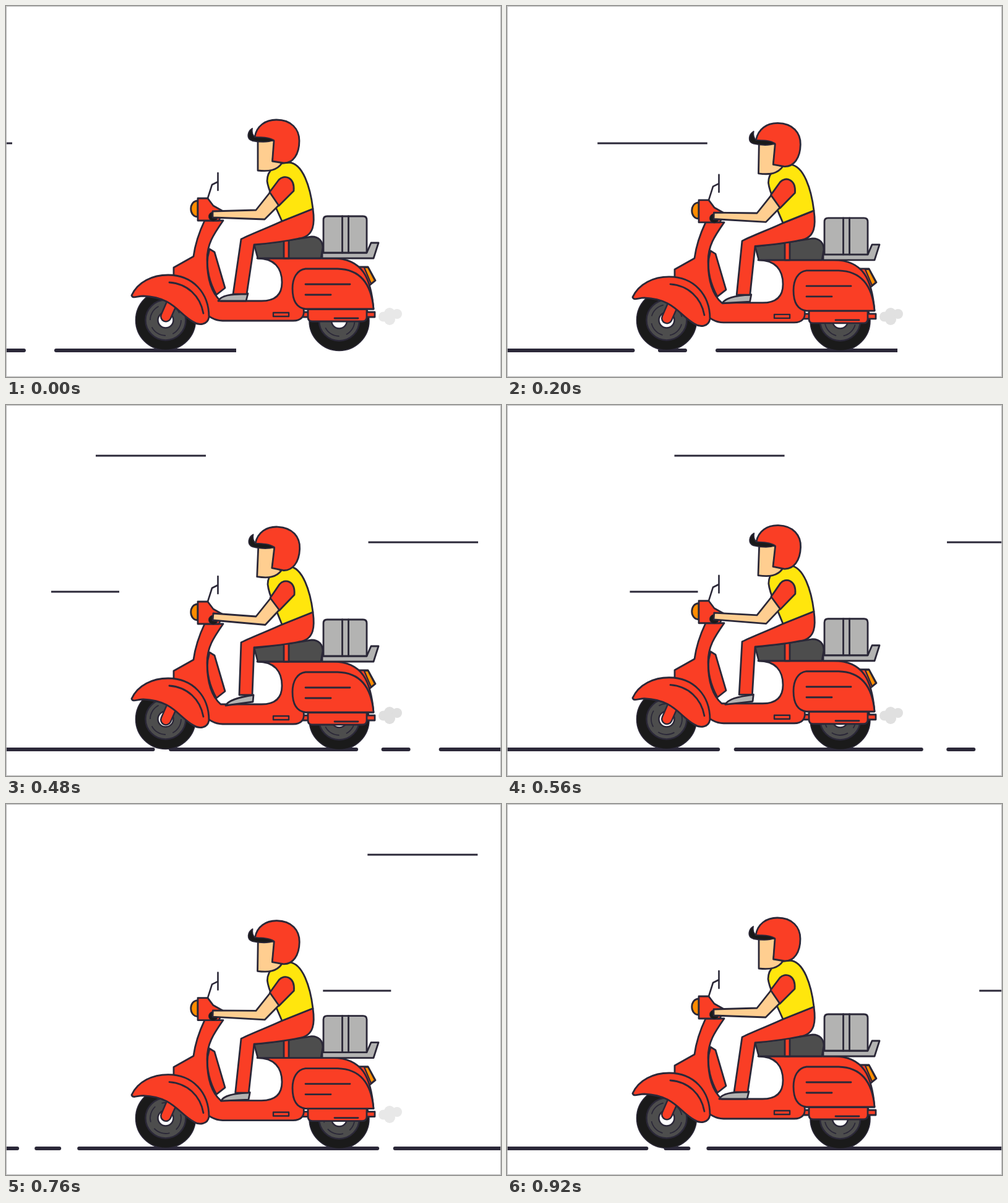
Animation, 800 px wide and 600 px high, one loop 960 ms. Source, as an HTML page with a canvas:

```html
<!DOCTYPE html>
<html lang="en">
<head>
<meta charset="utf-8">
<title>Scooter ride</title>
<style>
html, body { margin: 0; width: 100%; height: 100%; overflow: hidden; background: #fff; }
canvas { display: block; }
</style>
</head>
<body>
<canvas id="stage" width="800" height="600"></canvas>
<script>
const ctx = document.getElementById('stage').getContext('2d');
const LOOP = 960, STEP = 40, BOUNCE = 7;
const INK = '#2b2838', RED = '#fa3e25', YELLOW = '#ffe60d', SKIN = '#ffce90',
      ORANGE = '#ff8c00', GREY = '#b3b3b2', DARK = '#4d4d4d', BLACK = '#1a1a1a';
const TAU = Math.PI * 2;

const mix = (a, b, k) => a + (b - a) * k;

function shape(d, fill, width = 2.8) {
  const path = new Path2D(d);
  if (fill) { ctx.fillStyle = fill; ctx.fill(path); }
  if (width) { ctx.strokeStyle = INK; ctx.lineWidth = width; ctx.stroke(path); }
}

function disc(x, y, r, fill, width = 0) {
  ctx.beginPath();
  ctx.arc(x, y, r, 0, TAU);
  ctx.fillStyle = fill;
  ctx.fill();
  if (width) { ctx.strokeStyle = INK; ctx.lineWidth = width; ctx.stroke(); }
}

// Blends two paths that share the same commands.
function blend(from, to, k) {
  const ends = to.match(/-?[\d.]+/g);
  let i = 0;
  return from.replace(/-?[\d.]+/g, n => mix(+n, +ends[i++], k).toFixed(2));
}

// Piecewise linear value through [time, value] pairs.
function track(keys, t) {
  const i = Math.max(1, keys.findIndex(key => key[0] >= t));
  const [t0, v0] = keys[i - 1], [t1, v1] = keys[i];
  return mix(v0, v1, (t - t0) / (t1 - t0));
}

function speedLines(t) {
  ctx.fillStyle = INK;
  for (const [x, y, length] of [[-167.5, 222, 177.5], [-608, 82, 178], [-680, 302, 110]])
    ctx.fillRect(x + t * 1.5688, y - 1.5, length, 3);
}

function ground(t) {
  const dashes = [[-1400, -964], [-937, -896], [-868, -382], [-357.5, -53.5], [-14, 31], [79, 373]];
  ctx.fillStyle = INK;
  for (const [a, b] of dashes) {
    const left = a + t * 1.295, right = b + t * 1.295;
    const end = b === 373 ? 0 : 3;
    ctx.beginPath();
    ctx.roundRect(left - 1, 554, right - left + (end ? 2 : 0), 6, [3, end, end, 3]);
    ctx.fill();
  }
}

function wheel(x, y, t) {
  disc(x, y, 48.5, BLACK, 1.5);
  disc(x, y, 32.5, DARK, 2.5);
  ctx.save();
  ctx.translate(x, y);
  ctx.rotate(-t / LOOP * TAU);
  ctx.strokeStyle = INK;
  ctx.lineWidth = 1.8;
  for (let i = 0; i < 4; i++) {
    ctx.beginPath();
    ctx.arc(0, 0, 25, i * TAU / 4, i * TAU / 4 + 1.1);
    ctx.stroke();
  }
  ctx.restore();
  disc(x, y, 12.5, '#fff', 2.5);
}

function smoke(t) {
  const level = track([[0, 23], [200, 30], [320, 34], [480, 32], [560, 31], [760, 23], [880, 12], [920, 0]], t);
  const tone = Math.round(255 - level);
  const fill = `rgb(${tone},${tone},${tone})`;
  for (const [x, y, r] of [[610, 502.5, 8], [620, 497, 9], [632, 498, 8], [620, 507, 9]])
    disc(x, y, r, fill);
}

function fork() {
  ctx.lineCap = 'round';
  for (const [color, width] of [[INK, 19], [RED, 14]]) {
    ctx.beginPath();
    ctx.moveTo(269, 478);
    ctx.lineTo(258.5, 502);
    ctx.strokeStyle = color;
    ctx.lineWidth = width;
    ctx.stroke();
  }
}

function scooter() {
  shape('M480 495H596V503H480Z', RED);
  shape('M488 490H583V503Q583 510 576 510H495Q488 510 488 503Z', RED);
  shape('M531 505H569');
  shape('M563 422H585L597 444L586 453Z', RED);
  shape('M579 423H585L596 444L590 449Z', ORANGE, 2.2);

  // Body with leg shield, floor and tail
  shape('M271 440V423L303 405C306 383 312 366 321 347H351C335 370 325 385 325 410' +
    'C325 441 332 464 347 477H413C436 477 446 466 446 447C446 424 434 408 406 408' +
    'H528C576 408 590 440 594 490H481C483 502 477 509 464 509H350C338 509 325 502 315 490Z', RED);
  shape('M329 393L337 398L354 456L340 467C329 447 324 425 326 406Z', RED);
  shape('M484 425H536C577 426 591 455 594 490H484C468 488 463 474 463 457C463 440 470 427 484 425Z', RED);
  shape('M484 450H556M484 467H525');
  shape('M432 496H457V502H432Z', RED, 2.4);

  fork();
  shape('M203 468C213 446 237 435 262 435C302 435 328 464 328 503C326 516 312 517 303 511' +
    'C278 497 270 471 222 469C212 469 205 474 203 468Z', RED);
  shape('M264 447C293 449 314 469 319 497');

  // Rack, parcel and seat
  shape('M511 399H583L590 383H602L594 408H511Z', GREY);
  shape('M513 399V346Q513 340 519 340H577Q583 340 583 346V399Z', GREY);
  shape('M543.5 340V399M553.5 340V399');
  shape('M401 386L450 380L494 373C506 373 512 381 512 391L509 408H407Z', DARK);
  shape('M449 379H457V408H449Z', RED);

  // Headlight, handlebar and mirror
  shape('M310 315C295 315 295 341 310 341Z', ORANGE);
  shape('M310 311H326L335 323L351 332L344 347H310Z', RED);
  shape('M326 311L333 289L342 284.5M342.5 270V298', null, 2.6);
  disc(335, 340.5, 7.5, BLACK, 1);
}

function rider(p) {
  const posed = (a, b, fill) => shape(blend(a, b, p), fill);

  posed('M343 477C348 468 362 466 391 465L388 477Z',
        'M355 486C359 478 373 473 400 469L399 480Z', GREY);
  posed('M496 328C499 350 499 373 473 376C450 381 425 384 401 386L389 466H367L380 377C400 367 425 358 446 348Z',
        'M496 335C499 357 499 380 473 383C450 388 425 390 401 392L398 469H377L380 384C400 374 425 365 446 355Z', RED);
  posed('M446 348L496 328C492 294 480 254 457 253C436 253 422 266 422 283C424 300 435 315 437 328Z',
        'M446 355L496 335C492 303 480 262 457 261C436 261 423 274 423 290C425 309 435 324 438 335Z', YELLOW);
  posed('M334 332L404 330L427 301L441 322L418 345L334 342Z',
        'M335 337L404 342L428 312L442 331L419 355.5L334 348Z', SKIN);
  posed('M426 301L441 281C449 272 467 276 465 299L441 323Z',
        'M427 312L442 290C450 280 468 284 466 307L442 332Z', RED);

  ctx.save();
  ctx.translate(437, 235 + 13 * p);
  ctx.rotate(0.042 * p);
  ctx.translate(-437, -235);
  shape('M407 217V266C425 268 438 266 446 254L431 249L434 217Z', SKIN);
  shape('M402 212C405 194 419 184 437 184C461 184 474 199 474 218C474 240 464 254 449 254L430.5 251L433 218Z', RED);
  shape('M398 198C390 203 388 215 398 218C408 220 423 221 433 217C425 212 413 212 402 212C399 209 397 204 398 198Z', BLACK, 1.8);
  ctx.restore();
}

function draw(now) {
  const t = Math.floor((now % LOOP) / STEP) * STEP;
  const p = t <= 480 ? t / 480 : (920 - t) / 440;

  ctx.lineJoin = 'round';
  ctx.fillStyle = '#fff';
  ctx.fillRect(0, 0, 800, 600);
  speedLines(t);
  ground(t);
  smoke(t);
  wheel(258, 508, t);
  wheel(538.5, 509, t);

  ctx.save();
  ctx.translate(0, BOUNCE * p);
  ctx.lineCap = 'round';
  scooter();
  ctx.restore();
  rider(p);

  ctx.strokeStyle = '#b5b5b5';
  ctx.lineWidth = 1;
  ctx.strokeRect(0.5, 0.5, 799, 599);
}

const start = performance.now();
function tick() {
  draw(performance.now() - start);
  requestAnimationFrame(tick);
}
tick();
</script>
</body>
</html>
```
